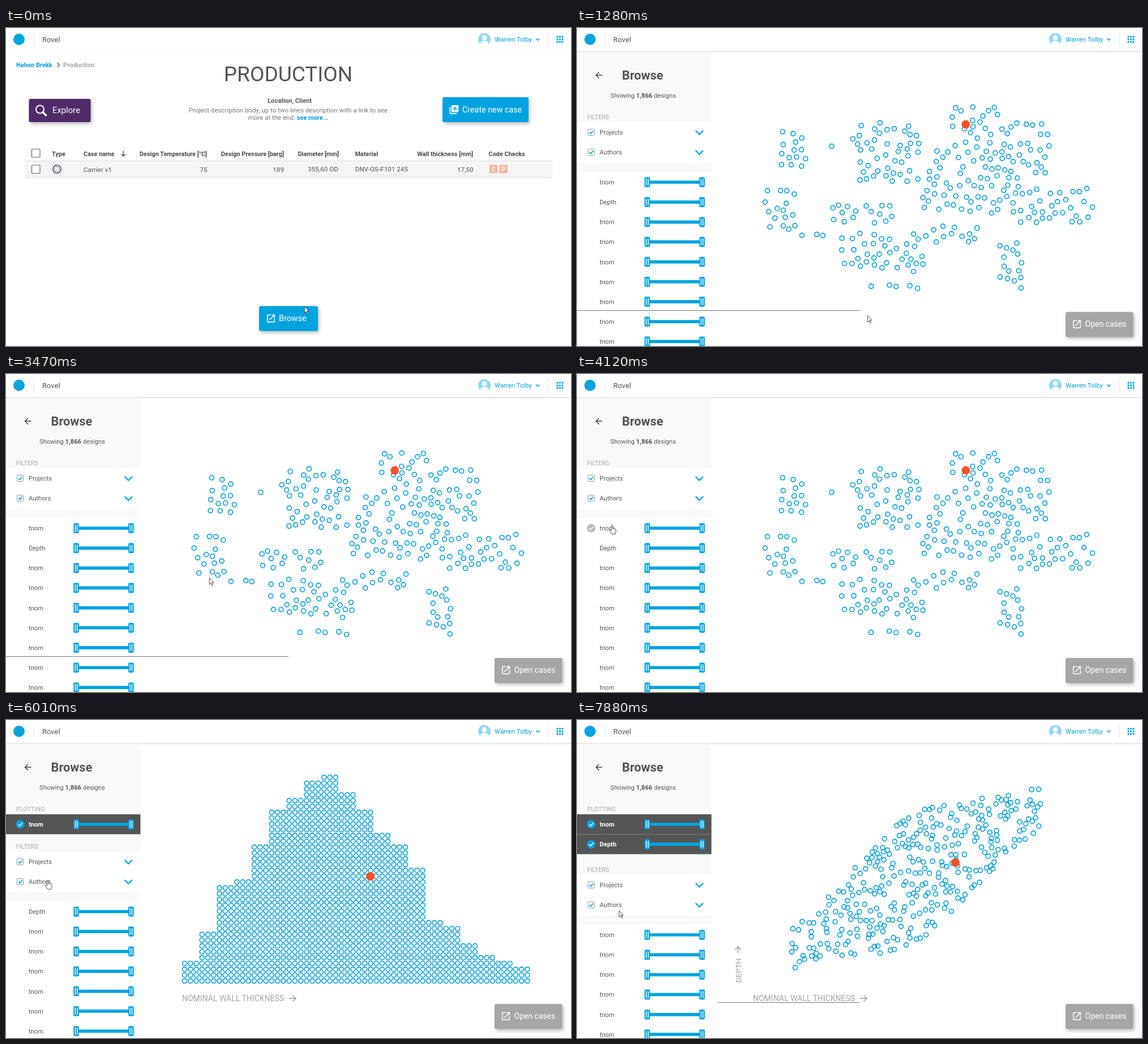
Write an HTML page that moves like this. It is 998 by 561 pixels and loops after 8000 ms.

```html
<!DOCTYPE html>
<html lang="en">
<head>
<meta charset="utf-8">
<title>Design browser</title>
<style>
html, body { margin: 0; width: 100%; height: 100%; overflow: hidden; background: #fff; }
#stage { position: absolute; left: 0; top: 0; display: block; }
text { font-family: Roboto, "Open Sans", sans-serif; font-size: 11.2px; fill: #555; white-space: pre; }
.b { font-weight: 700; }
.w { fill: #fff; }
.btn text { fill: #fff; }
.btn > rect { filter: drop-shadow(2px 3px 3px rgba(0, 0, 0, .28)); }
.head text { font-size: 10.9px; font-weight: 700; fill: #4a4a4a; }
.cells text { font-size: 11.7px; }
.about { font-size: 11.5px; fill: #777; }
.end { text-anchor: end; }
.mid { text-anchor: middle; }
.label { font-size: 10.75px; fill: #aaa; }
.axis text { font-size: 14px; fill: #a3a3a3; }
.axis path { fill: none; stroke: #999; stroke-width: 1.4; }
.dots { fill: #fff; stroke: #0a9fd8; stroke-width: 1.7; }
.line { fill: none; stroke: #777; stroke-width: 1; }

.loop { animation: 8s step-end infinite; }
#home { animation-name: home; }
.browse { animation-name: browse; }
.map { animation-name: map; }
.hist { animation-name: hist; }
.cloud { animation-name: cloud; }
#line1 { animation-name: line1; }
#line2 { animation-name: line2; }
#hover1 { animation-name: hover1; }
#hover2 { animation-name: hover2; }
#cursor { animation-name: move; }
#arrow { animation-name: arrow; }
#hand { animation-name: hand; }

@keyframes home { 16%, to { visibility: hidden } }
@keyframes browse { 0% { visibility: hidden } 16%, to { visibility: visible } }
@keyframes map { 0%, 61.5%, to { visibility: hidden } 16% { visibility: visible } }
@keyframes hist { 0%, 98.5%, to { visibility: hidden } 61.5% { visibility: visible } }
@keyframes cloud { 0% { visibility: hidden } 98.5%, to { visibility: visible } }
@keyframes line1 { 0%, 45.6%, to { visibility: hidden } 16% { visibility: visible } }
@keyframes line2 { 0%, 75.1%, to { visibility: hidden } 61.5% { visibility: visible } }
@keyframes hover1 { 0%, 61.5%, to { visibility: hidden } 45.6% { visibility: visible } }
@keyframes hover2 { 0%, 98.5%, to { visibility: hidden } 78.6% { visibility: visible } }
@keyframes arrow {
  0%, 16%, 61.5%, 98.5%, to { visibility: visible }
  1.25%, 45.6%, 71.3% { visibility: hidden }
}
@keyframes hand {
  0%, 16%, 61.5%, 98.5%, to { visibility: hidden }
  1.25%, 45.6%, 71.3% { visibility: visible }
}
@keyframes move {
  0% { transform: translate(527px, 491px) }
  1.25% { transform: translate(527px, 491px); animation-timing-function: steps(3, start) }
  4.8% { transform: translate(513px, 507px) }
  34.7% { transform: translate(513px, 507px); animation-timing-function: steps(6, start) }
  41.9% { transform: translate(541px, 485px); animation-timing-function: steps(3, start) }
  45.6% { transform: translate(268px, 297px); animation-timing-function: steps(2, start) }
  48% { transform: translate(100px, 270px); animation-timing-function: steps(4, start) }
  52.6% { transform: translate(62px, 267px) }
  71.3% { transform: translate(74px, 270px) }
  75.1% { transform: translate(74px, 270px); animation-timing-function: steps(5, start) }
  80.9%, to { transform: translate(74px, 336px) }
}
</style>
</head>
<body>
<svg id="stage" width="998" height="561" viewBox="0 0 998 561">
  <defs>
    <g id="slider">
      <path d="M124 0H221" stroke="#00a3de" stroke-width="5.7"/>
      <g id="grip">
        <rect x="119.3" y="-8.8" width="9.6" height="17.6" rx="2" fill="#00a3de"/>
        <path d="M122.4-6V6M125.8-6V6" stroke="#fff" stroke-width="1.4"/>
      </g>
      <use href="#grip" x="96.8"/>
    </g>
    <g id="tick">
      <circle cx="25" r="7.5"/>
      <path d="M21.2 .2L24 3L29-2.6" fill="none" stroke="#fff" stroke-width="1.5"/>
    </g>
    <g id="option">
      <rect x="19.5" y="-5.5" width="11" height="11" rx="1" fill="#fff" stroke="#8a9aa2"/>
      <path d="M22 0L24.4 2.5L28.4-2.5" fill="none" stroke="#00a3de" stroke-width="1.7"/>
      <path d="M209.5-3L216.3 3.6L223-3" fill="none" stroke="#00a3de" stroke-width="2.2"/>
    </g>
    <path id="open" transform="scale(.78) translate(-12 -12)" fill="#fff" d="M19 19H5V5h7V3H5c-1.1 0-2 .9-2 2v14c0 1.1.9 2 2 2h14c1.1 0 2-.9 2-2v-7h-2v7zM14 3v2h3.6l-9.8 9.8 1.4 1.4L19 6.4V10h2V3z"/>
  </defs>

  <g id="home" class="loop">
    <path d="M0 41.5H998" stroke="#f6f6f6"/>
    <text class="b" x="18" y="69" style="font-size:11px;fill:#009fd6">Halvor Brekk</text>
    <path d="M90.5 61.5L94.5 65.2L90.5 69" fill="none" stroke="#666" stroke-width="1.5"/>
    <text x="101" y="69" style="font-size:11.3px;font-weight:500;fill:#999">Production</text>
    <text class="mid" x="498.5" y="93.5" style="font-size:37px">PRODUCTION</text>
    <text class="mid b" x="501" y="132" style="font-size:11.1px">Location, Client</text>
    <text class="mid about" x="498.5" y="149">Project description body, up to two lines description with a link to see</text>
    <text class="mid about" x="498.5" y="162">more at the end. <tspan class="b" fill="#009fd6" font-size="11">see more...</tspan></text>

    <g class="btn">
      <rect x="40.5" y="125" width="109" height="41" rx="3" fill="#4f2c69"/>
      <circle cx="60" cy="143.5" r="7" fill="none" stroke="#fff" stroke-width="2"/>
      <path d="M65 148.5L70.5 154" stroke="#fff" stroke-width="3.4" stroke-linecap="round"/>
      <text x="82" y="150" style="font-size:14.8px">Explore</text>
    </g>
    <g class="btn">
      <rect x="771" y="122" width="152" height="44" rx="3" fill="#00a3de"/>
      <path transform="translate(782 134.5) scale(.78)" fill="#fff" d="M4 6H2v14c0 1.1.9 2 2 2h14v-2H4zM20 2H8c-1.1 0-2 .9-2 2v12c0 1.1.9 2 2 2h12c1.1 0 2-.9 2-2V4c0-1.1-.9-2-2-2zm-1 9h-4v4h-2v-4H9V9h4V5h2v4h4z"/>
      <text x="806" y="148.5" style="font-size:14.3px">Create new case</text>
    </g>
    <g class="btn">
      <rect x="447" y="490.5" width="104" height="44" rx="3" fill="#00a3de"/>
      <use href="#open" x="468" y="512.5"/>
      <text x="482" y="517" style="font-size:14.7px">Browse</text>
    </g>

    <rect x="33" y="234.5" width="932" height="29.5" fill="#f5f5f5"/>
    <path d="M33 234.5H965M33 264H965" stroke="#dedede"/>
    <g fill="#fff" stroke="#666" stroke-width="1.2">
      <rect x="45.5" y="213.5" width="14.5" height="14.5" rx="1"/>
      <rect x="45.5" y="242" width="14.5" height="14.5" rx="1"/>
      <circle cx="90" cy="249" r="7" stroke="#4f2c69" stroke-width="1.6"/>
      <circle cx="90" cy="249" r="4" stroke="#888"/>
    </g>
    <path d="M207.3 217V226M203.8 222.5L207.3 226L210.8 222.5" fill="none" stroke="#444" stroke-width="1.3"/>
    <g class="head">
      <text x="81" y="226">Type</text>
      <text x="137" y="226">Case name</text>
      <text class="end" x="355" y="226">Design Temperature [°C]</text>
      <text class="end" x="491" y="226">Design Pressure [barg]</text>
      <text class="end" x="588" y="226">Diameter [mm]</text>
      <text x="616.5" y="226">Material</text>
      <text class="end" x="825" y="226">Wall thickness [mm]</text>
      <text x="852.5" y="226">Code Checks</text>
    </g>
    <g class="cells">
      <text x="137" y="254">Carrier v1</text>
      <text class="end" x="355.5" y="254">75</text>
      <text class="end" x="491" y="254">189</text>
      <text class="end" x="587" y="253">355,60 OD</text>
      <text x="616.5" y="253">DNV-OS-F101 245</text>
      <text class="end" x="825.5" y="254">17,50</text>
    </g>
    <path d="M854 241.5h14.5v14.5h-14.5zM871.5 241.5h14.5v14.5h-14.5z" fill="#f7b5a3"/>
    <text class="mid b w" x="861.2" y="252.8">C</text>
    <text class="mid b w" x="878.7" y="252.8">P</text>
  </g>

  <g class="loop browse">
    <path d="M0 41.5H998" stroke="#dcdcdc"/>
    <path d="M0 42.7H998" stroke="#f2f2f2"/>
  </g>
  <g id="panels"></g>
  <g id="plots"></g>
  <path id="line1" class="line loop" d="M0 498.5H499"/>
  <path id="line2" class="line loop" d="M249 498.5H499M749 498.5H998"/>
  <path class="line loop cloud" d="M249 498.5H499"/>
  <g id="hover1" class="loop" fill="#bbb"><use href="#tick" y="272"/></g>
  <g id="hover2" class="loop" fill="#bbb"><use href="#tick" y="338"/></g>
  <g class="btn loop browse">
    <rect x="863" y="501" width="119.5" height="44" rx="3" fill="#a6a6a6"/>
    <use href="#open" x="883" y="522.5"/>
    <text x="897.5" y="527" style="font-size:14px">Open cases</text>
  </g>

  <circle cx="23" cy="20" r="10" fill="#00a3de"/>
  <path d="M49 8V33M957.5 8V33" stroke="#e4e4e4"/>
  <text x="64" y="24.5" style="font-size:13px">Rovel</text>
  <circle cx="845" cy="20" r="11" fill="#8fd8f2"/>
  <path d="M838 28.5C838 23.5 841 22.8 845 22.8S852 23.5 852 28.5A11 11 0 0 1 838 28.5ZM845 12.5a4.3 4.6 0 0 1 0 9.2a4.3 4.6 0 0 1 0-9.2Z" fill="#fff"/>
  <text x="863" y="24" style="font-size:11.4px;fill:#009fd6">Warren Tolby</text>
  <path d="M936 18.5L939.2 21.7L942.4 18.5" fill="none" stroke="#009fd6" stroke-width="1.4"/>
  <path d="M974 15.5h9.1M974 20h9.1M974 24.5h9.1" stroke="#00a3de" stroke-width="3.4" stroke-linecap="round" stroke-dasharray="0 4.5"/>

  <g id="cursor" class="loop" fill="#fff" stroke="#333" stroke-width=".9" stroke-linejoin="round">
    <path id="arrow" class="loop" d="M.3 .3V11.6L2.9 9.2L4.7 13.3L6.4 12.5L4.6 8.5H8Z"/>
    <path id="hand" class="loop" d="M-1.3 9V1a1.2 1.2 0 0 1 2.4 0V5.6a1.1 1.1 0 0 1 2 .4a1.1 1.1 0 0 1 2 .5a1 1 0 0 1 1.7 .8V10.6C6.8 13 5.6 13.4 5.4 15.4H-.6C-1 13.2-3 11.8-4.6 9.4C-5.2 8.2-4 7.3-2.9 8Z"/>
  </g>
</svg>

<script>
const $ = id => document.getElementById(id);
const text = (x, y, s, attrs = '') => `<text x="${x}" y="${y}" ${attrs}>${s}</text>`;
const use = (id, y) => `<use href="#${id}" y="${y}"/>`;
const rect = (y, h, fill) => `<rect y="${y}" width="237.5" height="${h}" fill="${fill}"/>`;
const ROW = 35.14;

// Sidebar: plotted rows on top, then filters pushed down by `off`, then sliders.
function panel(name, plotted, off, first) {
  let s = rect(43, 123 + off, '#f9f9f9') + rect(237.5 + off, 16.5, '#f9f9f9');
  s += '<path d="M44.5 83.2H33.8M38.8 78L33.6 83.2L38.8 88.4" fill="none" stroke="#444" stroke-width="1.5"/>';
  s += text(79.5, 91, 'Browse', 'class="b" style="font-size:21.8px"');
  s += text(59, 123, 'Showing <tspan class="b">1,866</tspan> designs');
  if (plotted.length) s += text(18, 161, 'PLOTTING', 'class="label"');
  plotted.forEach((row, i) => {
    const y = 184 + i * ROW;
    s += rect(y - 17.7, 35.2, '#555') + `<g fill="#00a3de">${use('tick', y)}</g>`;
    s += text(40, y + 4, row, 'class="b w"') + use('slider', y);
    if (i) s += `<path d="M0 ${y - 17.5}H237.5" stroke="#777"/>`;
  });
  s += text(18, 161 + off, 'FILTERS', 'class="label"');
  ['Projects', 'Authors'].forEach((row, i) => {
    const y = 184 + off + i * ROW;
    s += (i ? '' : rect(y - 17.7, 71, '#fff')) + use('option', y) + text(40, y + 4, row);
  });
  for (let y = 272 + off, i = 0; y < 575; y += ROW, i++)
    s += text(40, y + 4, first[i] || 'tnom') + use('slider', y);
  return `<g class="loop ${name}">${s}</g>`;
}

const ring = ([x, y]) => `M${(x - 4).toFixed(1)} ${y.toFixed(1)}a4 4 0 1 1 8 0a4 4 0 1 1-8 0Z`;
const plot = (name, points, x, y, extra = '') =>
  `<g class="loop ${name}"><path class="dots" d="${points.map(ring).join('')}"/>
   <circle cx="${x}" cy="${y}" r="7.4" fill="#ff5029"/>${extra}</g>`;

function random(seed) {
  return () => (seed = (seed * 16807) % 2147483647) / 2147483647;
}

// Throws dots at the plot area; keeps those inside the shape and `gap` apart.
function scatter(inside, count, gap, seed) {
  const rnd = random(seed), points = [];
  for (let n = 0; n < 60000 && points.length < count; n++) {
    const x = 320 + rnd() * 595, y = 115 + rnd() * 350;
    if (inside(x, y) && points.every(p => Math.hypot(p[0] - x, p[1] - y) > gap)) points.push([x, y]);
  }
  return points;
}

// Islands as [left, right, top, bottom].
const islands = [
  [361, 405, 175, 244], [425, 456, 188, 215], [325, 387, 276, 362], [383, 448, 353, 367],
  [486, 605, 166, 275], [448, 560, 309, 347], [630, 755, 205, 240], [660, 755, 139, 205],
  [760, 836, 166, 256], [608, 780, 240, 327], [747, 911, 283, 343], [463, 612, 362, 430],
  [508, 602, 453, 460], [604, 710, 347, 380], [745, 805, 376, 460]
];
const onIsland = (x, y) => islands.some(([l, r, t, b]) => x > l && x < r && y > t && y < b);

// Rising band that widens in the middle.
function inBand(x, y) {
  const u = (x - 378) / 444;
  const mid = 402 - 250 * u, half = 40 + 75 * Math.sin(Math.PI * u) ** 2;
  return u > 0 && u < 1 && y > 116 && y < 442 && Math.abs(y - mid) < half;
}

// Stacked dots: every height is shared by three columns.
const heights = [4, 9, 17, 18, 24, 30, 32, 35, 36, 33, 30, 26, 24, 20, 11, 10, 7, 5, 4, 3];
const PITCH = 10.26;
const stacks = heights.flatMap((h, g) => Array.from({ length: h * 3 }, (_, i) =>
  [315.5 + (g * 3 + i % 3) * PITCH, 460.3 - Math.floor(i / 3) * PITCH]));

const xAxis = `<g class="axis">${text(311, 495.5, 'NOMINAL WALL THICKNESS')}
  <path d="M500 491H512M506.5 485.5L512 491L506.5 496.5"/></g>`;
const yAxis = `<g class="axis"><text transform="translate(289.5 463.5) rotate(-90)" style="font-size:13.6px">DEPTH</text>
  <path d="M284.5 411V400M279 405.5L284.5 400L290 405.5"/></g>`;

$('panels').innerHTML = panel('map', [], 0, ['tnom', 'Depth'])
  + panel('hist', ['tnom'], 66, ['Depth'])
  + panel('cloud', ['tnom', 'Depth'], 107, []);
$('plots').innerHTML = plot('map', scatter(onIsland, 305, 10.8, 41), 686.7, 170)
  + plot('hist', stacks, 643.5, 275.8, xAxis)
  + plot('cloud', scatter(inBand, 325, 6, 7), 668.5, 251.5, xAxis + yAxis);
</script>
</body>
</html>
```
